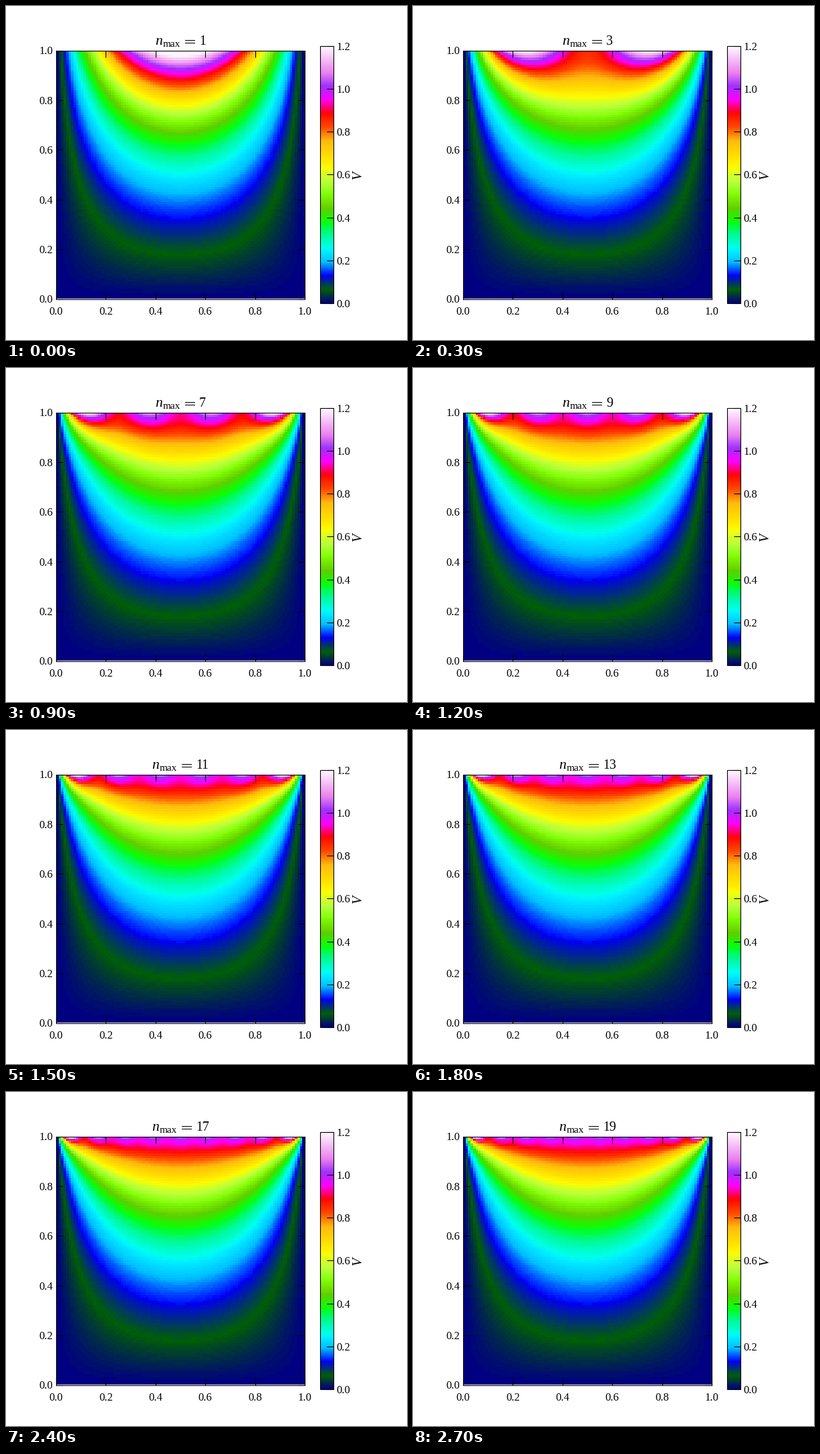
A matplotlib script for the animation above (3000 ms loop, 600 px wide and 500 px high).

```python
import numpy as np
import matplotlib.pyplot as plt
from matplotlib.animation import FuncAnimation

W, H = 600, 500
FRAMES, INTERVAL = 10, 300
GRID = 100

plt.rcParams.update({
    "font.family": "Liberation Serif",
    "font.size": 12,
    "axes.linewidth": 0.8,
})

x = np.linspace(0, 1, GRID)
y = x[:, None]


def harmonic(n):
    """Odd term of the series for a box with its lid held at V = 1."""
    return 4 / (n * np.pi) * np.sin(n * np.pi * x) * np.sinh(n * np.pi * y) / np.sinh(n * np.pi)


potentials = np.cumsum([harmonic(2 * k + 1) for k in range(FRAMES)], axis=0)


def pixel_box(left, top, width, height):
    return [left / W, 1 - (top + height) / H, width / W, height / H]


fig = plt.figure(figsize=(W / 100, H / 100), dpi=100, facecolor="white")
ax = fig.add_axes(pixel_box(75, 66.5, 372, 372))
bar_ax = fig.add_axes(pixel_box(470.25, 60, 19.25, 385))

image = ax.imshow(potentials[0], origin="lower", extent=(0, 1, 0, 1), cmap="gist_ncar",
                  vmin=0, vmax=1.2, interpolation="nearest", aspect="auto")
ticks = np.linspace(0, 1, 6)
ax.set_xticks(ticks)
ax.set_yticks(ticks)
ax.tick_params(direction="in", length=7, width=0.8, top=True, right=True)
ax.tick_params(axis="x", pad=8.3)
ax.tick_params(axis="y", pad=3.5)

bar = fig.colorbar(image, cax=bar_ax, ticks=np.linspace(0, 1.2, 7), format="%.1f")
bar.ax.tick_params(direction="in", length=7, width=0.8, pad=3.5)


def label(px, py, text, size, **style):
    return fig.text(px / W, 1 - py / H, text, fontsize=size, **style)


label(527.5, 252.5, "V", 14.4, style="italic", rotation=90, ha="center", va="center")

symbol = label(0, 58, "n", 15.5, style="italic")
subscript = label(0, 61, "max", 11)
number = label(0, 58, "", 14.4)
equals = [fig.add_artist(plt.Line2D([0, 0], [1 - py / H] * 2, color="black", lw=0.75))
          for py in (50.5, 54.5)]


def update(frame):
    image.set_data(potentials[frame])
    digits = str(2 * frame + 1)
    left = 261 - (66 + 10 * len(digits)) / 2
    symbol.set_x(left / W)
    subscript.set_x((left + 11.5) / W)
    for line in equals:
        line.set_xdata([(left + 44.5) / W, (left + 58.5) / W])
    number.set_x((left + 66) / W)
    number.set_text(digits)
    return [image, symbol, subscript, number, *equals]


anim = FuncAnimation(fig, update, frames=FRAMES, interval=INTERVAL, repeat=True, repeat_delay=0)
plt.show()
```
